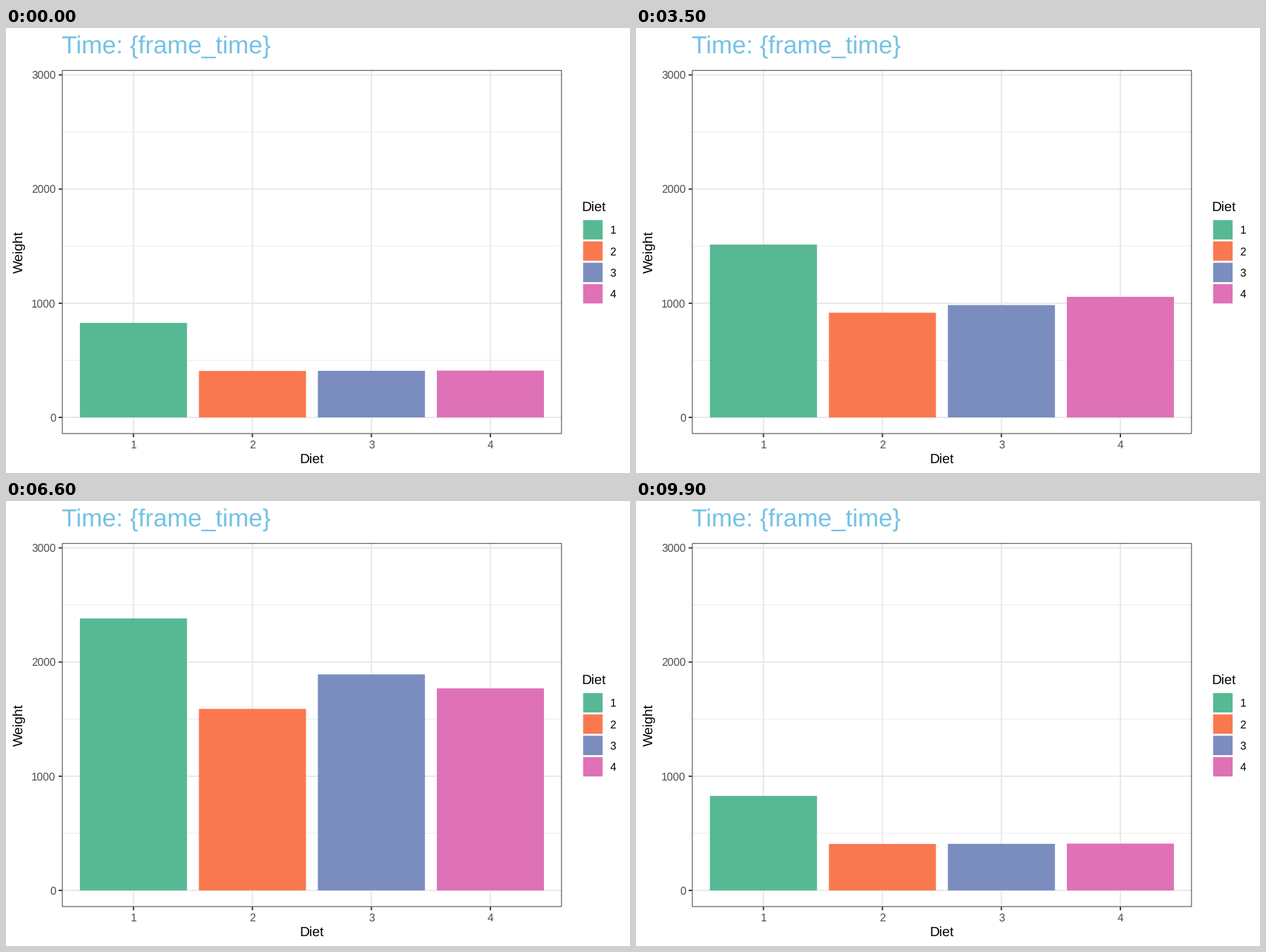
A matplotlib script that plays this animation: 885 px wide and 632 px high, repeating every 10000 ms.

```python
import matplotlib.pyplot as plt
from matplotlib.animation import FuncAnimation
from matplotlib.patches import Rectangle

W, H, DPI = 885, 632, 100
PX = 72 / DPI
LEFT, RIGHT, TOP, BOTTOM = 79.5, 788.25, 59.8, 576.4
COLORS = ["#57B894", "#FA7850", "#7B8DBF", "#DF71B6"]
DARK, GRID = "#333333", "#E8E8E8"

# Total weight per diet at days 0, 2, ..., 20, 21
TOTALS = [
    [828, 945, 1073, 1269, 1514, 1768, 2062, 2221, 2459, 2702, 2897, 2844],
    [407, 494, 598, 754, 917, 1085, 1313, 1419, 1647, 1877, 2056, 2147],
    [408, 504, 622, 779, 984, 1171, 1444, 1645, 1974, 2331, 2589, 2703],
    [410, 518, 645, 839, 1056, 1260, 1514, 1618, 1820, 2029, 2105, 2147],
]
DAYS = 12
STARTS = [5, 14, 23, 32, 41, 49, 56, 64, 72, 80, 88, 96]
STEPS = [3 if s == 49 else 4 for s in STARTS]

# (diet, day index): weight on top that leaves at once / arrives at the end
LOST = {(0, 1): 35, (0, 6): 54, (0, 7): 68, (3, 9): 146}
GAINED = {(0, 11): 121, (3, 11): 42}
# Opening inside the stack: (size, weight above it) before and after
GAPS = {(0, 10): ((125, 426), (0, 435)), (0, 11): ((0, 435), (42, 165))}

plt.rcParams["font.family"] = "Liberation Sans"
plt.rcParams["text.hinting"] = "none"

fig = plt.figure(figsize=(W / DPI, H / DPI), dpi=DPI, facecolor="white")
ax = fig.add_axes([0, 0, 1, 1])
ax.set_xlim(0, W)
ax.set_ylim(H, 0)
ax.axis("off")


def xpos(i):
    return 180.75 + 168.75 * i


def ypos(v):
    return 553.05 - 0.16215 * v


def line(x0, y0, x1, y1, width, color, z):
    ax.plot([x0, x1], [y0, y1], color=color, lw=width * PX, zorder=z,
            solid_capstyle="butt", snap=False)


def label(x, y, s, size, color="black", **kw):
    ax.text(x, y, s, fontsize=size * PX, color=color, va="baseline", **kw)


def rect(x, y, w, h, color, z=3):
    return ax.add_patch(Rectangle((x, y), w, h, fc=color, lw=0, zorder=z,
                                  snap=False))


def lerp(a, b, t):
    return a + (b - a) * t


# Grid, ticks and axis labels
for v in (500, 1500, 2500):
    line(LEFT, ypos(v), RIGHT, ypos(v), 0.95, GRID, 1)
for v in range(0, 3001, 1000):
    y = ypos(v)
    line(LEFT, y, RIGHT, y, 1.9, GRID, 1)
    line(LEFT - 4.8, y, LEFT, y, 1.9, DARK, 5)
    label(70.8, y + 5.5, str(v), 15.5, "#4D4D4D", ha="right")
for i in range(4):
    x = xpos(i)
    line(x, TOP, x, BOTTOM, 1.9, GRID, 1)
    line(x, BOTTOM, x, BOTTOM + 4.8, 1.9, DARK, 5)
    label(x, 597, str(i + 1), 15.5, "#4D4D4D", ha="center")
ax.add_patch(Rectangle((LEFT + 0.4, TOP + 0.4), RIGHT - LEFT - 0.8,
                       BOTTOM - TOP - 0.8, fill=False, ec=DARK, lw=0.95 * PX,
                       zorder=4, snap=False))

label(79.4, 36, "Time: {frame_time}", 35.2, "#74C2E5")
label((LEFT + RIGHT) / 2, 618, "Diet", 19.4, ha="center")
label(23.7, 318.1, "Weight", 19.4, ha="center", rotation=90,
      rotation_mode="anchor")

# Legend
label(816.8, 260.3, "Diet", 19.4)
for i, c in enumerate(COLORS):
    y = 272.8 + 30.3 * i
    rect(818.5, y, 27.7, 27.5, c)
    label(856.7, y + 19.5, str(i + 1), 15.5)

HALF = 75.93
lower = [rect(xpos(i) - HALF, ypos(0), 2 * HALF, 0, c)
         for i, c in enumerate(COLORS)]
upper = [rect(xpos(i) - HALF, ypos(0), 2 * HALF, 0, c)
         for i, c in enumerate(COLORS)]


def span(bar, v0, v1):
    bar.set_y(ypos(v1))
    bar.set_height(ypos(v0) - ypos(v1))


def progress(frame):
    """Day index and share of the way to the next day."""
    day = 0
    for k, (start, steps) in enumerate(zip(STARTS, STEPS)):
        done = frame - start + 1
        if 0 < done < steps:
            return k, done / steps
        if done >= steps:
            day = (k + 1) % DAYS
    return day, 0


def update(frame):
    day, t = progress(frame)
    for d in range(4):
        top, gap, above = TOTALS[d][day], 0, 0
        if t:
            key = (d, day)
            end = TOTALS[d][(day + 1) % DAYS] - GAINED.get(key, 0)
            top = lerp(top - LOST.get(key, 0), end, t)
            if key in GAPS:
                gap, above = (lerp(a, b, t) for a, b in zip(*GAPS[key]))
        span(lower[d], 0, top - above - gap)
        span(upper[d], top - above, top)
        upper[d].set_visible(above > 0)
    return lower + upper


anim = FuncAnimation(fig, update, frames=100, interval=100, repeat=True,
                     repeat_delay=0, blit=False)
plt.show()
```
